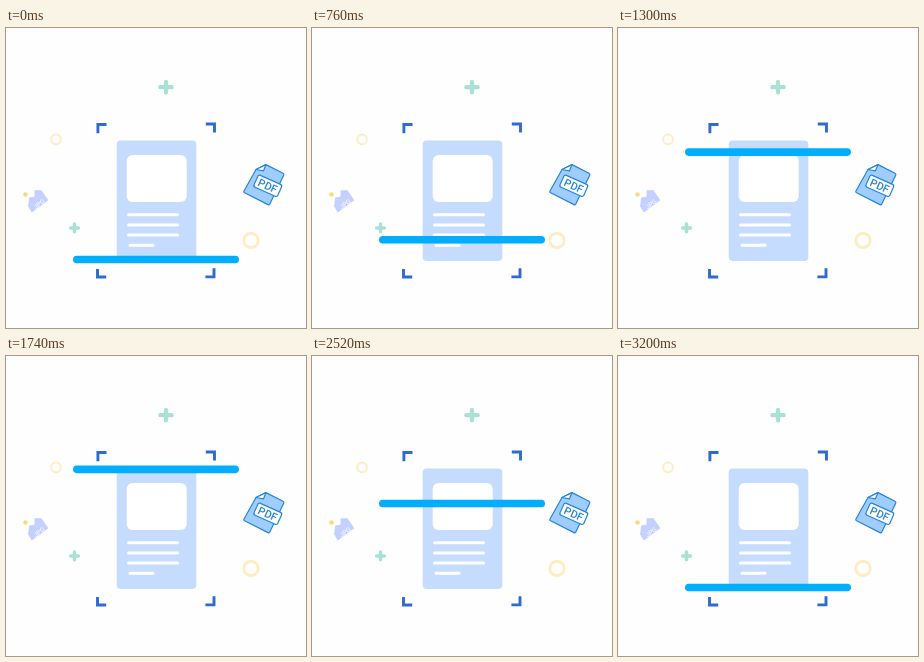
Recreate the animation shown at these times as an HTML page. Size 300 by 300 pixels, loop 3220 ms.

```html
<!DOCTYPE html>
<html lang="en">
<head>
<meta charset="utf-8">
<title>Document scan</title>
<style>
html, body { margin: 0; width: 100%; height: 100%; overflow: hidden; background: #fefefe; }
svg { display: block; width: 100%; height: 100%; }
text { font-family: Roboto, "Liberation Sans", sans-serif; text-anchor: middle; }
</style>
</head>
<body>
<svg viewBox="0 0 300 300" fill="none">
  <!-- floating decorations -->
  <g stroke="#a9e2d5" stroke-linecap="round">
    <path d="M154.300 59.200h11.400M160 53.800v10.800" stroke-width="4.200"/>
    <path d="M64.600 199.900h7.800M68.500 196v7.800" stroke-width="3.500"/>
  </g>
  <g stroke="#ffecc2">
    <circle cx="50" cy="111.400" r="4.800" stroke-width="2"/>
    <circle cx="245" cy="212.400" r="7.200" stroke-width="2.900"/>
  </g>
  <circle cx="19.500" cy="166.500" r="2.300" fill="#f5dc84"/>

  <!-- image file -->
  <path d="M28.500 162.300H35.500L42.400 172.300L25.800 184.600L22 178.300L23.200 169.400L28.500 168.800Z" fill="#c4d1ff"/>
  <text transform="translate(34.500 178) rotate(-38)" font-size="6.500" fill="#fff">JPG</text>

  <!-- document file -->
  <g stroke="#2585d8" stroke-width="1.200" stroke-linejoin="round">
    <path d="M260 136.600L277 145.300Q278.300 146 277.700 147.300L263.800 176Q263.200 177.200 262 176.600L238.600 164.800Q237.400 164.200 238 163L250 141.500Z" fill="#9fcdff"/>
    <path d="M250 141.500L260 136.600L257.500 142.800Z" fill="#fff"/>
    <rect x="-13" y="-6.500" width="26" height="13" rx="2" transform="translate(261.800 157.800) rotate(24)" fill="#fff"/>
  </g>
  <text transform="translate(261.800 157.800) rotate(24)" y="3.900" font-size="10.800" font-weight="500" fill="#2585d8">PDF</text>

  <!-- page being scanned -->
  <rect x="110.700" y="112.500" width="79.600" height="120.500" rx="4" fill="#c6dcff"/>
  <rect x="120.700" y="127" width="60" height="47" rx="6" fill="#fff"/>
  <path d="M122.500 186.700h49M122.500 196.900h49M122.500 207.100h49M124 217.200h23" stroke="#fff" stroke-width="3" stroke-linecap="round"/>
  <path d="M100.500 96.500H91.900V105.300M199.800 96H208.500V104.500M91.500 241V249H100.200M208 240.200V248.900H199.400" stroke="#2f6bcd" stroke-width="2.900"/>

  <rect id="bar" x="67" y="-3.800" width="166" height="7.600" rx="3.800" fill="#00adff"/>
</svg>
<script>
const LOOP = 3220, BOTTOM = 231.5, TOP = 113;
const bar = document.getElementById("bar");

// cubic-bezier(.88, 0, .53, 1), solved by bisection
function ease(x) {
  let lo = 0, hi = 1;
  for (let i = 0; i < 24; i++) {
    const s = (lo + hi) / 2, r = 1 - s;
    if (3 * r * r * s * 0.88 + 3 * r * s * s * 0.53 + s ** 3 < x) lo = s;
    else hi = s;
  }
  return lo * lo * (3 - 2 * lo);
}

let start;
function draw(now) {
  start ??= now;
  const phase = (now - start) % LOOP / LOOP * 2;
  const lift = phase < 1 ? ease(phase) : 1 - ease(phase - 1);
  bar.setAttribute("transform", `translate(0 ${BOTTOM + (TOP - BOTTOM) * lift})`);
  requestAnimationFrame(draw);
}
requestAnimationFrame(draw);
</script>
</body>
</html>
```
